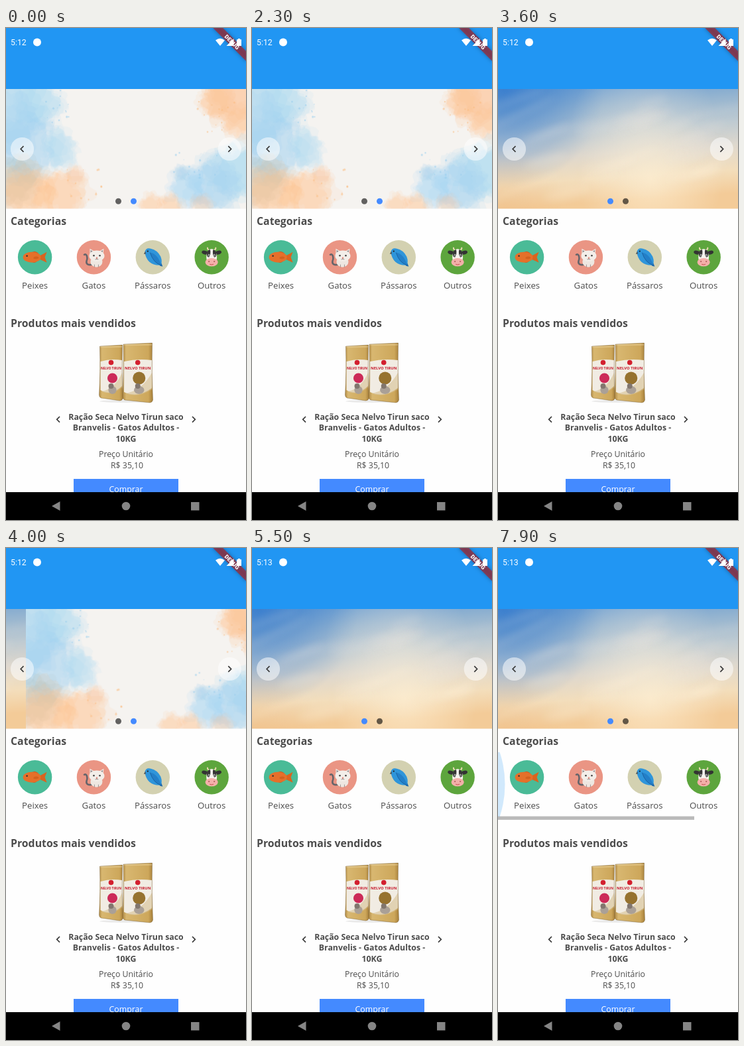
Animation of 362 by 742 pixels, one loop 8000 ms. Source, as an HTML page with a canvas:

```html
<!DOCTYPE html>
<html lang="pt">
<head>
<meta charset="utf-8">
<title>Loja</title>
<style>
html, body { margin: 0; width: 100%; height: 100%; overflow: hidden; background: #fff; }
canvas { display: block; width: 362px; height: 742px; }
</style>
</head>
<body>
<canvas id="stage"></canvas>
<script>
const W = 362, H = 742, LOOP = 8000;
const SANS = '"Open Sans", "Noto Sans", sans-serif';
const BLUE = '#2196f3', ACCENT = '#448aff', INK = '#4c4c4c';
const dpr = window.devicePixelRatio || 1;
const stage = document.getElementById('stage');
stage.width = W * dpr;
stage.height = H * dpr;
let c = stage.getContext('2d');

// ---- helpers
function rng(seed) {
  return () => (seed = (seed * 16807) % 2147483647) / 2147483647;
}
const clamp = v => Math.max(0, Math.min(1, v));
const ramp = (t, from, len) => clamp((t - from) / len);
const easeOut = v => 1 - Math.pow(1 - v, 3);

function rect(x, y, w, h, col) {
  c.fillStyle = col;
  c.fillRect(x, y, w, h);
}
function oval(x, y, rx, ry, col, rot = 0) {
  c.fillStyle = col;
  c.beginPath();
  c.ellipse(x, y, rx, ry, rot, 0, Math.PI * 2);
  c.fill();
}
const disc = (x, y, r, col) => oval(x, y, r, r, col);
function poly(col, ...p) {
  c.fillStyle = col;
  c.beginPath();
  for (let i = 0; i < p.length; i += 2) c.lineTo(p[i], p[i + 1]);
  c.closePath();
  c.fill();
}
function shape(col, d) {
  c.fillStyle = col;
  c.fill(new Path2D(d));
}
function stroke(col, width, d) {
  c.strokeStyle = col;
  c.lineWidth = width;
  c.stroke(new Path2D(d));
}
function text(s, x, y, size, col = INK, weight = 400, align = 'center', family = SANS) {
  c.font = `${weight} ${size}px ${family}`;
  c.textAlign = align;
  c.fillStyle = col;
  c.fillText(s, x, y);
}
function at(x, y, draw) {
  c.save();
  c.translate(x, y);
  draw();
  c.restore();
}
function clipped(x, y, w, h, draw) {
  c.save();
  c.beginPath();
  c.rect(x, y, w, h);
  c.clip();
  draw();
  c.restore();
}

// ---- banner pictures, painted once
function picture(paint) {
  const cv = document.createElement('canvas'), main = c;
  cv.width = W * dpr;
  cv.height = 180 * dpr;
  c = cv.getContext('2d');
  c.scale(dpr, dpr);
  paint();
  c = main;
  return cv;
}

function paintWatercolor() {
  const rnd = rng(77);
  const wash = (x, y, r, rgb, strength = 1) => {
    for (let layer = 0; layer < 6; layer++) {
      const size = r * (0.68 + 0.09 * layer), pts = [];
      const p1 = rnd() * 6, p2 = rnd() * 6, p3 = rnd() * 6;
      for (let i = 0; i < 72; i++) {
        const a = i / 72 * Math.PI * 2;
        const d = size * (1 + 0.15 * Math.sin(2 * a + p1) + 0.12 * Math.sin(5 * a + p2)
          + 0.07 * Math.sin(11 * a + p3) + (rnd() - 0.5) * 0.12);
        pts.push(x + d * Math.cos(a), y + d * Math.sin(a));
      }
      poly(`rgba(${rgb},${0.15 * strength})`, ...pts);
    }
  };
  const spray = (x, y, w, h, rgb, n) => {
    for (let i = 0; i < n; i++)
      disc(x + rnd() * w, y + rnd() * h, 0.4 + rnd() * 1.3, `rgba(${rgb},.55)`);
  };
  const sky = '152,206,238', peach = '252,190,132', grey = '165,172,165';
  rect(0, 0, W, 180, '#f5f3f0');
  wash(5, 40, 55, sky);
  wash(48, 22, 36, sky, 0.6);
  wash(30, 88, 50, sky, 0.8);
  wash(82, 90, 27, sky, 0.6);
  wash(12, 140, 38, grey, 0.5);
  wash(32, 155, 40, peach, 0.8);
  wash(84, 158, 36, peach, 0.7);
  wash(105, 130, 14, peach, 0.4);
  wash(345, 8, 46, peach, 0.9);
  wash(318, 18, 26, peach, 0.6);
  wash(352, 50, 25, peach, 0.6);
  wash(350, 125, 44, sky, 0.9);
  wash(312, 145, 40, sky, 0.8);
  wash(274, 148, 28, sky, 0.7);
  wash(264, 126, 12, sky, 0.4);
  wash(218, 176, 18, peach, 0.6);
  wash(248, 176, 18, peach, 0.6);
  wash(295, 174, 16, peach, 0.4);
  spray(285, 5, 60, 65, peach, 16);
  spray(60, 2, 50, 50, sky, 14);
  spray(240, 95, 100, 40, sky, 16);
  spray(90, 120, 55, 50, peach, 14);
}

function paintSky() {
  const rnd = rng(31);
  const g = c.createLinearGradient(0, 0, 12, 180);
  ['#6d9fd2', '#98b6d0', '#bfcbd2', '#dfd8cd', '#f3debc', '#f3cb98']
    .forEach((col, i) => g.addColorStop(i / 5, col));
  rect(0, 0, W, 180, g);
  const glow = (x, y, r, rgb, a) => {
    const q = c.createRadialGradient(x, y, 0, x, y, r);
    q.addColorStop(0, `rgba(${rgb},${a})`);
    q.addColorStop(1, `rgba(${rgb},0)`);
    rect(0, 0, W, 180, q);
  };
  glow(10, 0, 150, '40,115,205', 0.7);
  glow(220, 55, 110, '226,226,222', 0.5);
  glow(230, 135, 110, '255,240,212', 0.7);
  glow(10, 180, 90, '238,186,130', 0.4);
  c.filter = `blur(${6 * dpr}px)`;
  for (let i = 0; i < 24; i++) {
    const y = 15 + rnd() * 150;
    oval(rnd() * W, y, 25 + rnd() * 45, 3 + rnd() * 6,
      y < 95 ? 'rgba(235,232,226,.17)' : 'rgba(255,240,216,.22)', -0.15 - rnd() * 0.35);
  }
  c.filter = 'none';
}

// ---- category icons, centred on 0,0
function fish() {
  poly('#d9641f', 7, -2, 18, -8, 15, 0, 18, 8, 7, 3);
  shape('#cf5a1c', 'M-7 -6 Q0 -12 6 -5 Z M-6 6 Q0 11 4 5 Z');
  oval(-4.5, 0, 13.5, 8, '#e5702a');
  shape('#d3611f', 'M-2 0 Q4 -3 6 1 Q3 4 -2 2 Z');
  disc(-12, -2, 1.3, '#333');
}
function cat() {
  stroke('#66646a', 2.6, 'M-2 11 Q-12 13 -11 6 Q-9 1 -11 -3 Q-13 -6 -15 -3');
  oval(4, 7, 9, 8, '#eee7e1');
  poly('#eee7e1', -6, -4, -6, -13, 1, -9);
  poly('#eee7e1', 8, -9, 15, -13, 14, -3);
  poly('#8d868a', -4.7, -6, -4.8, -10.8, -1, -8.5);
  poly('#8d868a', 10, -8.5, 13.7, -10.8, 13, -6);
  oval(4.5, -2, 11.5, 8.3, '#f3eee9');
  disc(0, -2.5, 1.3, '#444');
  disc(9, -2.5, 1.3, '#444');
  disc(4.5, 1, 1.2, '#e58478');
  stroke('#8a8280', 0.8, 'M2 3 Q4 4.5 4.5 2 Q5 4.5 7 3 M1 11 v4 M7 11 v4');
}
function bird() {
  poly('#1f69ab', 6, 6, 11, 3, 15, 14, 11, 13);
  shape('#2f95da', 'M-12 -8 Q-10 -15 -3 -13 Q7 -11 12 -1 Q15 7 12 12 Q2 13 -5 7 Q-11 1 -12 -8 Z');
  shape('#237fc8', 'M-4 -7 Q7 -6 13 12 Q1 9 -4 -7 Z');
  stroke('#1b5f9d', 0.9, 'M-4 -7 Q1 9 13 12');
  poly('#4d4d4d', -11, -9, -13.5, -5, -10.5, -5);
  disc(-7.5, -9, 1.1, '#222');
}
function cow() {
  oval(-10, -7, 5, 2.8, '#333', 0.25);
  oval(10, -7, 5, 2.8, '#333', -0.25);
  stroke('#e8d9b0', 1.8, 'M-4 -11 Q-7 -12 -6 -15 M4 -11 Q7 -12 6 -15');
  oval(0, 0, 8, 12.5, '#f7f4ef');
  shape('#353535', 'M-7 -7 Q-5 -12 -2 -11 Q-1 -3 -4 0 Q-8 0 -7 -7 Z M7 -7 Q5 -12 2 -11 Q1 -3 4 0 Q8 0 7 -7 Z');
  for (const s of [-1, 1]) {
    disc(s * 4, -3, 1.6, '#fff');
    disc(s * 4, -3, 0.9, '#111');
  }
  oval(0, 7.5, 9.5, 6.3, '#f4b0aa');
  disc(-4, 6.5, 1.1, '#b7605f');
  disc(4, 6.5, 1.1, '#b7605f');
  stroke('#c8504f', 1, 'M-3 10.5 Q0 12 3 10.5');
}
function ladybug() {
  stroke('#222', 0.8, 'M-2 -9 Q-3 -13 -6 -14 M2 -9 Q3 -13 6 -14');
  oval(0, -5.5, 6.5, 5.5, '#262626');
  oval(0, 3.5, 11.5, 11.5, '#dc2a26');
  shape('#262626', 'M-7 -5.5 Q0 -12 7 -5.5 Q0 -2 -7 -5.5 Z');
  stroke('#262626', 1.2, 'M0 -5 V15');
  for (const s of [-1, 1]) {
    disc(s * 5, 2, 2.2, '#262626');
    disc(s * 5, 9, 1.9, '#262626');
  }
}

const categories = [
  ['Peixes', '#4abb97', fish], ['Gatos', '#ea9584', cat], ['Pássaros', '#d3d1b1', bird],
  ['Outros', '#5da53d', cow], ['Jardim', '#5da53d', ladybug]
];

// ---- screen parts
function chevron(x, y, dir, col = '#3a3a3a') {
  stroke(col, 1.7, `M${x - 2 * dir} ${y - 4.3} L${x + 2.3 * dir} ${y} L${x - 2 * dir} ${y + 4.3}`);
}

function header(t) {
  rect(0, 0, W, 92, BLUE);
  c.save();
  c.translate(W, 0);
  c.rotate(Math.PI / 4);
  c.shadowColor = 'rgba(0,0,0,.5)';
  c.shadowBlur = 6 * dpr;
  rect(-36, 24.6, 72, 10.6, 'rgba(183,28,28,.63)');
  c.shadowColor = 'transparent';
  text('DEBUG', 0, 33, 8.6, '#fff', 900, 'center', 'Roboto, sans-serif');
  c.restore();

  text(t < 4800 ? '5:12' : '5:13', 7, 26.3, 12.3, '#fff', 400, 'left', 'Roboto, sans-serif');
  disc(47, 21.5, 6, '#fff');
  shape('#fff', 'M316 18.5 Q323 13 330 18.5 L323 27 Z');
  poly('#fff', 332.5, 27, 343.5, 16, 343.5, 27);
  shape('#fff', 'M348 17.3 h2 v-1.3 h3 v1.3 h2 v9.7 h-7 z');
}

const art = [picture(paintWatercolor), picture(paintSky)];
const slides = [2360, 3726, 5050];

function carousel(t) {
  const pos = slides.reduce((sum, start) => sum + ramp(t, start, 300), 0);
  const first = Math.floor(pos);
  clipped(0, 92, W, 180.5, () => {
    for (const i of [first, first + 1])
      c.drawImage(art[i % 2], (i - pos) * W, 92, W, 180.5);
  });
  [[24.5, -1], [337.3, 1]].forEach(([x, dir]) => {
    disc(x, 182.5, 17.6, 'rgba(255,255,255,.53)');
    chevron(x, 182.5, dir);
  });
  const active = Math.round(pos) % 2 ? 0 : 1;
  [169.5, 192.5].forEach((x, i) =>
    disc(x, 261.3, 4.5, i === active ? ACCENT : 'rgba(0,0,0,.6)'));
}

function categoryList(t) {
  const scroll = 80.3 * (easeOut(ramp(t, 5900, 550)) - easeOut(ramp(t, 7150, 500)));
  text('Categorias', 7, 296.7, 15.84, INK, 700, 'left');
  categories.forEach(([name, col, icon], i) => {
    const x = 43.6 + i * 88.85 - scroll;
    disc(x, 345.7, 25.7, col);
    at(x, 345.7, icon);
    text(name, x, 393, 13.2);
  });
  rect(scroll * 0.82, 404.6, 296, 5.3, `rgba(0,0,0,${0.27 * ramp(t, 5900, 250)})`);
  const pull = 10.5 * easeOut(ramp(t, 7600, 300));
  if (pull > 0) clipped(0, 308, W, 97, () => disc(pull - 154, 356.5, 154, 'rgba(33,150,243,.2)'));
}

function bag(x, y, w, h, spot) {
  const r = x + w, b = y + h, mid = x + w / 2;
  const gold = c.createLinearGradient(x, 0, r, 0);
  gold.addColorStop(0, '#b08a45');
  gold.addColorStop(0.12, '#d8b770');
  gold.addColorStop(0.85, '#cda75b');
  gold.addColorStop(1, '#a67f3a');
  const body = `M${x + 1} ${y + 2} L${r - 1} ${y} Q${r - 2} ${y + h / 2} ${r} ${b - 4}`
    + ` Q${r - 1} ${b} ${r - 5} ${b} L${x + 3} ${b - 4} Q${x} ${b - 5} ${x} ${b - 9} Q${x + 2} ${y + h / 2} ${x + 1} ${y + 2} Z`;
  shape(gold, body);
  shape('#f1ece3', `M${x + 2} 503 Q${mid} 498 ${r - 1.5} 501 V${b - 22} Q${mid} ${b - 6} ${x + 2} ${b - 16} Z`);
  shape('rgba(214,190,140,.55)', `M${r - 1.5} 520 Q${mid + 6} ${b - 18} ${x + 4} ${b - 14} Q${mid} ${b - 6} ${r - 1.5} ${b - 20} Z`);
  rect(x + 1, y + 2, w - 2, 1.5, 'rgba(255,240,200,.4)');
  disc(mid, 504.5, 3.8, '#d3202f');
  text('NELVO TIRUN', mid, 515, w * 0.128, '#c4182a', 700);
  disc(mid + 2, 528, w * 0.21, spot);
  oval(mid + 2, 546, w * 0.17, 6, '#aaa097');
  disc(mid, 540, 4, '#81766e');
  stroke('rgba(90,65,25,.45)', 0.8, body);
}

function product() {
  text('Produtos mais vendidos', 7, 450.8, 15.84, INK, 700, 'left');
  oval(181, 563, 40, 2, 'rgba(0,0,0,.08)');
  bag(140.5, 478, 36, 84, '#cc2a58');
  bag(176, 475, 45.5, 90, '#96722f');
  chevron(79, 590.3, -1);
  chevron(283, 590.3, 1);
  clipped(94, 575, 174, 60, () => {
    ['Ração Seca Nelvo Tirun saco', 'Branvelis - Gatos Adultos -', '10KG']
      .forEach((line, i) => text(line, 181, 590.6 + i * 16.7, 12.32, INK, 700));
  });
  text('Preço Unitário', 181, 647.4, 12.32);
  text('R$ 35,10', 182.5, 664.2, 12.32);
  rect(102, 680, 158, 30, ACCENT);
  text('Comprar', 181, 700.3, 12.32, '#fff');
}

function navBar() {
  const grey = '#858585';
  rect(0, 700, W, 42, '#000');
  poly(grey, 69, 721, 81.5, 714, 81.5, 728);
  disc(181, 721, 6.3, grey);
  rect(279, 715, 12.5, 12.5, grey);
}

function frame(now) {
  const t = now % LOOP;
  c.setTransform(dpr, 0, 0, dpr, 0, 0);
  rect(0, 0, W, H, '#fefefe');
  header(t);
  carousel(t);
  categoryList(t);
  product();
  navBar();
}

const begin = performance.now();
function tick() {
  frame(performance.now() - begin);
  requestAnimationFrame(tick);
}
tick();
</script>
</body>
</html>
```
